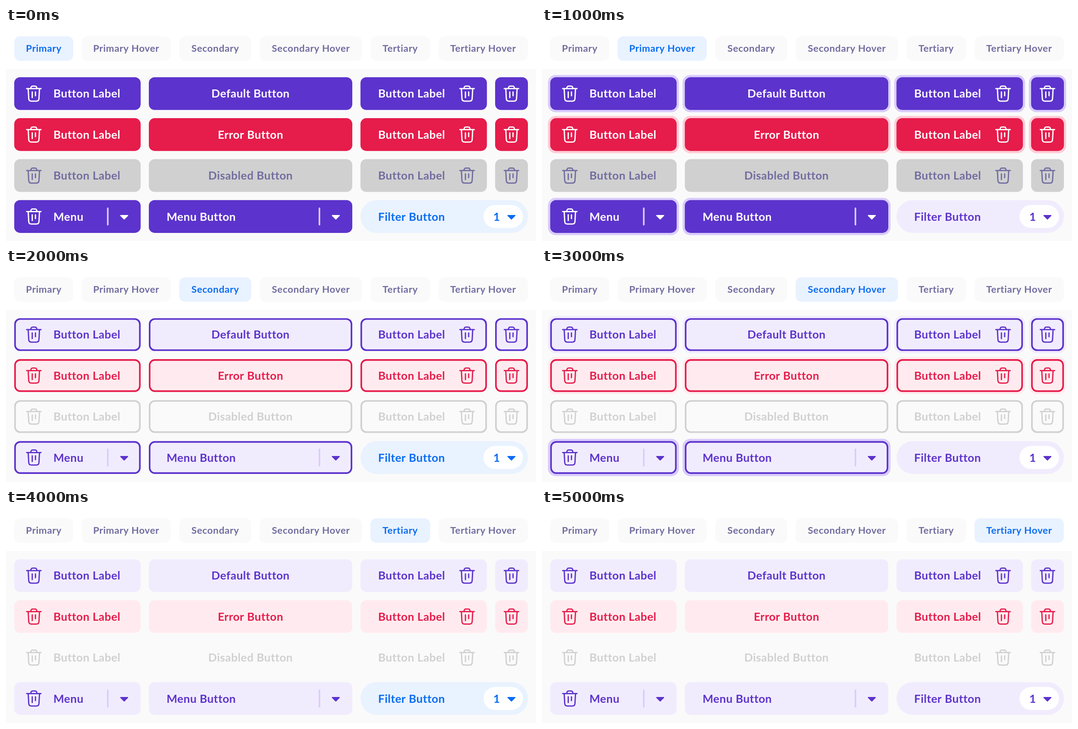
Recreate the animation shown at these times as an HTML page with a canvas. Size 1180x475 px, loop 6 s.

```html
<!DOCTYPE html>
<html lang="en">
<head>
<meta charset="utf-8">
<title>Button states</title>
<style>
  html, body { margin: 0; width: 100%; height: 100%; overflow: hidden; background: #fff; }
  canvas { display: block; width: 1180px; height: 475px; }
</style>
</head>
<body>
<canvas id="stage"></canvas>
<script>
const W = 1180, H = 475, STEP = 1000;
const canvas = document.getElementById('stage');
const ctx = canvas.getContext('2d');
const dpr = window.devicePixelRatio || 1;
canvas.width = W * dpr;
canvas.height = H * dpr;

const PURPLE = '#5c33cc', RED = '#e61c4b', BLUE = '#086cf2', GREY = '#d0d0d0', MUTED = '#716c9f';
const LILAC = '#f1ecfd', PINK = '#ffebef', SKY = '#e9f2ff', PALE = '#fafafa';
const LAVENDER = '#d9ccfb', ROSE = '#ffccd6';

// [label, left, width]
const tabs = [
  ['Primary', 18.3, 131.5], ['Primary Hover', 168.2, 198.8], ['Secondary', 385.7, 160.3],
  ['Secondary Hover', 564.7, 228], ['Tertiary', 811.2, 133], ['Tertiary Hover', 963, 198.7]
];
const cols = [[18.3, 281.5], [318, 453], [789.2, 281.5], [1089, 73]];
const rowTop = i => 109.7 + i * 91.37;
const ROW_H = 73.1;

function box(x, y, w, h, r, fill) {
  ctx.beginPath();
  ctx.roundRect(x, y, w, h, r);
  ctx.fillStyle = fill;
  ctx.fill();
}

function text(str, x, y, size, spacing, color, align = 'left') {
  ctx.font = `700 ${size}px Lato, sans-serif`;
  ctx.letterSpacing = spacing + 'px';
  ctx.textAlign = align;
  ctx.fillStyle = color;
  ctx.fillText(str, x, y);
}

const label = (str, x, top, color, align) => text(str, x, top + 45.7, 25.2, 0.45, color, align);

const trashPath = new Path2D(
  'M-16 -11.2H16 M-7.2 -11.4L-5.9 -15Q-5.2 -16.8 -3.4 -16.8H3.4Q5.2 -16.8 5.9 -15L7.2 -11.4' +
  'M-12.6 -11L-11.4 11Q-11 16.7 -5.6 16.7H5.6Q11 16.7 11.4 11L12.6 -11' +
  'M-3.6 -3.8V8.8 M3.6 -3.8V4.6');

function trash(x, top, color) {
  ctx.save();
  ctx.translate(x, top + 36.7);
  ctx.strokeStyle = color;
  ctx.lineWidth = 2.8;
  ctx.lineCap = ctx.lineJoin = 'round';
  ctx.stroke(trashPath);
  ctx.restore();
}

function caret(x, top, color) {
  const y = top + 38;
  ctx.beginPath();
  ctx.moveTo(x - 7.7, y - 3.6);
  ctx.lineTo(x + 7.7, y - 3.6);
  ctx.lineTo(x, y + 4.2);
  ctx.closePath();
  ctx.fillStyle = ctx.strokeStyle = color;
  ctx.lineWidth = 2.4;
  ctx.lineJoin = 'round';
  ctx.fill();
  ctx.stroke();
}

function button(col, top, s) {
  const [x, w] = cols[col];
  if (s.ring) box(x - 5, top - 5, w + 10, ROW_H + 10, 17, s.ring);
  if (s.fill) box(x, top, w, ROW_H, 13, s.fill);
  if (s.border) {
    ctx.beginPath();
    ctx.roundRect(x + 1.8, top + 1.8, w - 3.6, ROW_H - 3.6, 11.5);
    ctx.strokeStyle = s.border;
    ctx.lineWidth = 3.6;
    ctx.stroke();
  }
}

function buttonRow(i, title, s) {
  const y = rowTop(i);
  for (let c = 0; c < 4; c++) button(c, y, s);
  trash(62, y, s.ink);
  label('Button Label', 105.5, y, s.ink);
  label(title, 544.4, y, s.ink, 'center');
  label('Button Label', 828.5, y, s.ink);
  trash(1026.5, y, s.ink);
  trash(1125.3, y, s.ink);
}

function menuRow(s, hover) {
  const y = rowTop(3);
  button(0, y, s);
  button(1, y, s);
  trash(62, y, s.ink);
  label('Menu', 105.5, y, s.ink);
  label('Menu Button', 357.5, y, s.ink);
  for (const x of [226.6, 697.8]) {
    box(x - 1.8, y + 16.4, 3.6, 40.2, 1.8, LAVENDER);
    caret(x + 36.5, y, s.ink);
  }
  const ink = hover ? PURPLE : BLUE;
  box(789.2, y, 372.8, ROW_H, ROW_H / 2, hover ? LILAC : SKY);
  box(1063, y + 11, 88, 51.2, 25.6, '#fff');
  label('Filter Button', 828.5, y, ink);
  label('1', 1092.5, y, ink, 'center');
  caret(1125.3, y, ink);
}

// kind: 0 primary, 1 secondary, 2 tertiary
function style(kind, main, tint, ring) {
  return {
    fill: kind ? tint : main,
    ink: kind ? main : '#fff',
    border: kind === 1 && main,
    ring
  };
}

function draw(state) {
  const kind = state >> 1, hover = state % 2 === 1;
  const ring = (strong, soft) => hover && [strong, soft, null][kind];

  ctx.setTransform(dpr, 0, 0, dpr, 0, 0);
  ctx.fillStyle = '#fff';
  ctx.fillRect(0, 0, W, H);
  ctx.fillStyle = PALE;
  ctx.fillRect(0, 91.4, W, H);

  tabs.forEach(([name, x, w], i) => {
    const on = i === state;
    box(x, 18.4, w, 54.6, 13, on ? SKY : PALE);
    text(name, x + w / 2, 53.2, 21.6, 0.6, on ? BLUE : MUTED, 'center');
  });

  buttonRow(0, 'Default Button', style(kind, PURPLE, LILAC, ring(LAVENDER, LILAC)));
  buttonRow(1, 'Error Button', style(kind, RED, PINK, ring(ROSE, PINK)));
  buttonRow(2, 'Disabled Button', {
    fill: kind === 0 && GREY,
    ink: kind ? GREY : MUTED,
    border: kind === 1 && GREY
  });
  menuRow(style(kind, PURPLE, LILAC, ring(LAVENDER, LAVENDER)), hover);
}

const start = performance.now();
function tick() {
  draw(Math.floor((performance.now() - start) / STEP) % tabs.length);
  requestAnimationFrame(tick);
}
tick();
</script>
</body>
</html>
```
